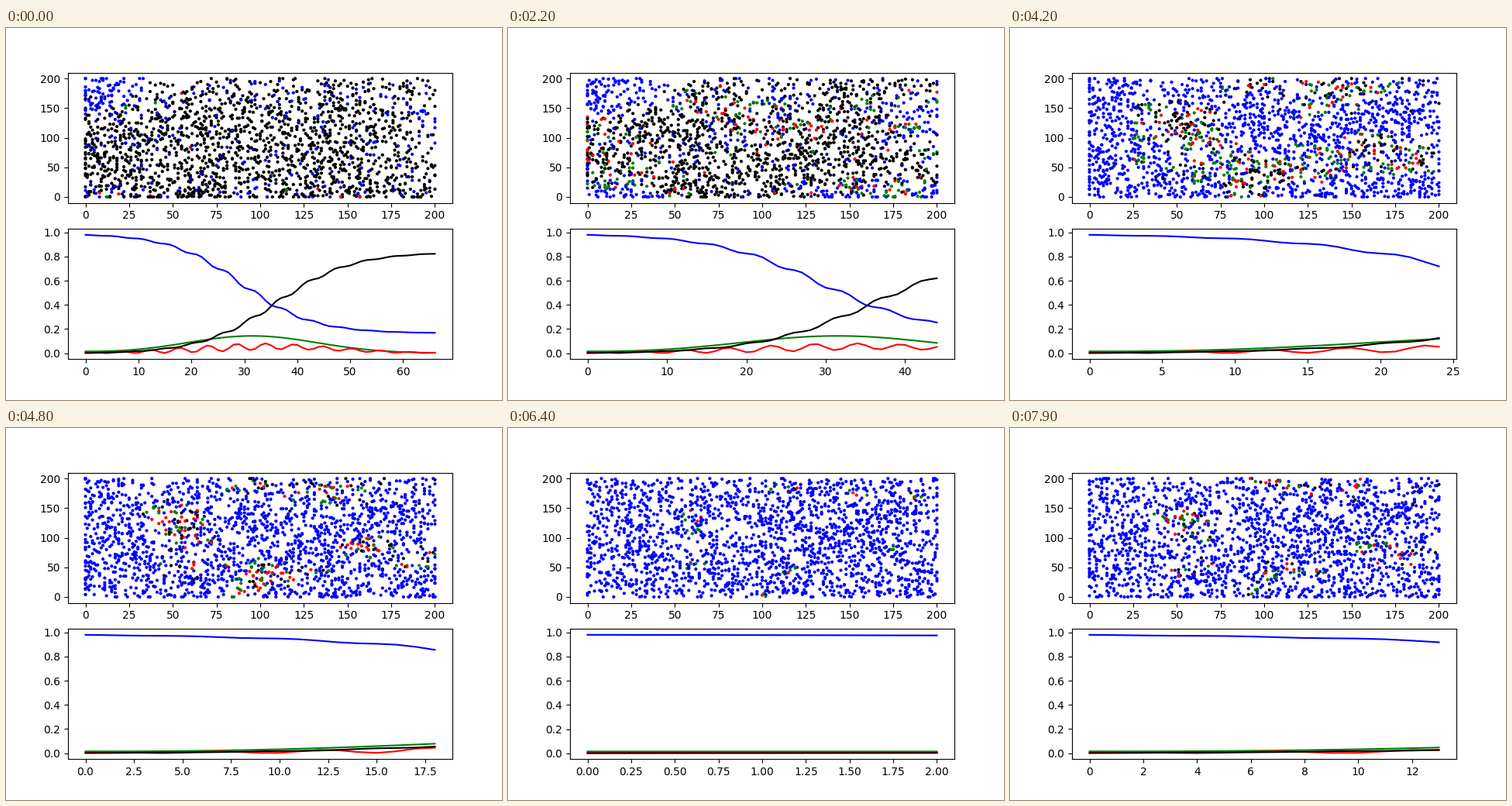
Animation of 640 by 480 pixels, one loop 8000 ms. Source, as a matplotlib script:

```python
import numpy as np
import matplotlib.pyplot as plt
from matplotlib.animation import FuncAnimation

N, SIZE, LAST = 2000, 200, 66
FRAMES, INTERVAL = 80, 100
PERIOD = 5.45  # days between waves of infection
COLORS = np.array(["blue", "green", "red", "black"])
days = np.arange(LAST + 1)


def logistic(t, center, rate):
    return 1 / (1 + np.exp(-rate * (t - center)))


def bump(center, width):
    return np.exp(-((days - center) / width) ** 2)


def stepped(rest, depth):
    """Time that slows down around `rest` and once per period from there."""
    w = 2 * np.pi / PERIOD
    return days - depth / w * np.sin(w * (days - rest))


susceptible = .990 - .825 * logistic(stepped(31, .7), 29.4, .149)
removed = np.maximum(.84 * logistic(stepped(32.3, .65), 36, .141) - .004, 0)
exposed = .143 * bump(31.5, 17.3) + .01 * np.exp(-days / 6)

# The infectious share pulses between two envelopes.
high, low = .082 * bump(33, 20), .031 * bump(38, 14)
pulse = (1 + np.cos(2 * np.pi * (days - 34) / PERIOD)) / 2
infectious = low + (high - low) * pulse

shares = [susceptible, exposed, infectious, removed]


def walk(rng):
    """Integer random walks held inside the square, with a few seed clusters."""
    centers = [(112, 186), (118, 187), (150, 177), (171, 80), (100, 11),
               (64, 137), (60, 55), (114, 43), (57, 113), (191, 168)]
    seeds = np.repeat(centers, 4, axis=0)
    pos = rng.integers(0, SIZE + 1, (N, 2))
    pos[:len(seeds)] = seeds + rng.integers(-3, 4, seeds.shape)
    path = [pos.clip(0, SIZE)]
    for _ in range(LAST):
        step = np.rint(rng.normal(-.15, 3.2, (N, 2))).astype(int)
        path.append((path[-1] + step).clip(0, SIZE))
    return np.array(path), list(rng.permutation(len(seeds)))


def spread(rng, path, order):
    """Rank walkers by when they catch it: the closest to carriers come first."""
    for day in days:
        new = int(round((1 - susceptible[day]) * N)) - len(order)
        if new <= 0:
            continue
        healthy = np.setdiff1d(np.arange(N), order)
        carriers = order[int(removed[day] * N):]
        gap = path[day][healthy][:, None] - path[day][carriers][None]
        score = np.hypot(gap[..., 0], gap[..., 1]).min(axis=1)
        score = score + rng.exponential(10, len(healthy))
        order.extend(healthy[np.argsort(score)[:new]])
    rank = np.full(N, N)
    rank[order] = np.arange(len(order))
    return rank


rng = np.random.default_rng(11)
path, first = walk(rng)
rank = spread(rng, path, first)


def states(day):
    limits = np.array([1 - susceptible[day], removed[day] + infectious[day],
                       removed[day]])
    return (rank[:, None] < np.rint(limits * N)).sum(axis=1)


fig, (field, chart) = plt.subplots(2, 1, figsize=(6.4, 4.8), dpi=100)
dots = field.scatter(*path[0].T, s=4)
field.set(xlim=(-10, 210), ylim=(-10, 210))
lines = [chart.plot([], [], color=c)[0] for c in COLORS]


def draw(i):
    day = abs(LAST - i)
    dots.set_offsets(path[day])
    dots.set_color(COLORS[states(day)])
    for line, share in zip(lines, shares):
        line.set_data(days[:day + 1], share[:day + 1])
    chart.relim()
    chart.autoscale_view()
    return [dots, *lines]


anim = FuncAnimation(fig, draw, frames=FRAMES, interval=INTERVAL,
                     init_func=lambda: draw(0), repeat=True, repeat_delay=0)
plt.show()
```
